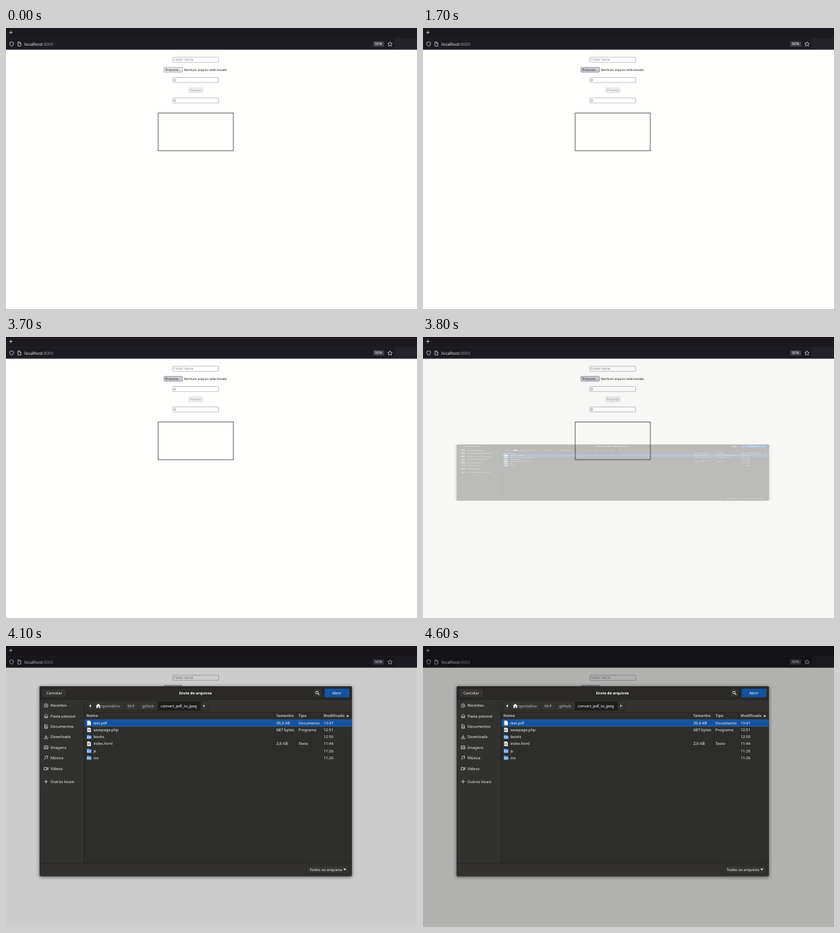
An HTML page for the animation above (5100 ms loop, 600x412 px).

```html
<!DOCTYPE html>
<html lang="pt-BR">
<head>
<meta charset="utf-8">
<title>Envio de arquivos</title>
<style>
  html, body { margin: 0; width: 100%; height: 100%; overflow: hidden; background: #fefefd; }
  svg { display: block; width: 100vw; height: 100vh; }
  text { font-family: "Noto Sans", "Open Sans", sans-serif; text-rendering: geometricPrecision; white-space: pre; }
  #dialog { filter: drop-shadow(0 1px 2.5px rgba(0, 0, 0, .6)); }
</style>
</head>
<body>
<svg id="stage" viewBox="0 0 600 412" preserveAspectRatio="none">
  <g id="page"></g>
  <rect id="dim" width="600" height="412" opacity="0"/>
  <g id="dialog"></g>
</svg>
<script>
const LOOP = 5100, STEP = 100;
const $ = id => document.getElementById(id);
let layer;

function add(tag, attrs, content) {
  const el = document.createElementNS('http://www.w3.org/2000/svg', tag);
  for (const k in attrs) el.setAttribute(k, attrs[k]);
  if (content) el.textContent = content;
  return layer.appendChild(el);
}
const box = (x, y, width, height, fill, more) => add('rect', { x, y, width, height, fill, ...more });
const text = (x, y, str, size, fill, more) => add('text', { x, y, 'font-size': size, fill, ...more }, str);
const line = (d, stroke, width = .8, more) => add('path', { d, stroke, 'stroke-width': width, fill: 'none', ...more });
const shape = (d, fill) => add('path', { d, fill });
const frame = (x, y, w, h, fill, stroke, width = .6, rx = .8) =>
  box(x, y, w, h, fill, { stroke, 'stroke-width': width, rx });

// Browser window
layer = $('page');
box(0, 0, 600, 412, '#fefefd');
box(0, 0, 600, 15, '#1c1a1f');
box(0, 14.5, 600, 17, '#24222a');
box(0, 15.5, 567.5, 15, '#1c1b21', { rx: 1 });
box(0, 30.6, 600, 1, '#2c2030');
line('M4.6 6.5h5M7.1 4v5', '#dddde2', .8);
line('M8.2 20.2l2.7 1v2.2q0 2.2-2.7 3.4q-2.7-1.2-2.7-3.4v-2.2z', '#d5d5da', .8);
line('M17.4 20.4h2.5l1.8 1.8v4.3h-4.3zM19.7 20.5v1.9h2', '#d5d5da', .8);
text(27, 25.6, 'localhost', 6.25, '#f3f3f5');
text(53.5, 25.6, ':8000', 6.1, '#96959d');
box(536, 19.4, 16, 7.9, '#42414c', { rx: 1 });
text(538.4, 25.4, '90%', 5.5, '#f0f0f3');
line('M560.6 20.1l1 2.2 2.4.3-1.8 1.6.5 2.4-2.1-1.2-2.1 1.2.5-2.4-1.8-1.6 2.4-.3z', '#e0e0e5', .7);

// Form
const field = (y, str, color) => {
  const el = frame(243.5, y, 67, 7.4, '#fff', '#9a9aa2');
  text(245.1, y + 5.4, str, 4.7, color);
  return el;
};
const folder = field(42.9, 'Folder Name', '#85858a');
const browse = frame(230.7, 57.8, 26.8, 7, '#e9e9ed', '#85858e');
text(232.4, 63, 'Procurar…', 4.75, '#111');
text(259.6, 63, 'Nenhum arquivo selecionado.', 4.55, '#151515');
const count = field(72.5, '0', '#222');
frame(266.9, 87.9, 20.3, 6.9, '#f4f4f5', '#c3c3c7');
text(268.6, 93, 'Process', 4.7, '#8d8d92');
field(102.5, '0', '#222');
box(222.1, 124.7, 109.8, 55.2, 'none', { stroke: '#4c4c4c', 'stroke-width': .9 });

// File chooser
layer = $('dialog');
const INK = '#eeeeec', SOFT = '#b9b9b6', EDGE = '#1b1b1a', SIZE = 5.65;
const label = (x, y, str, size = SIZE, fill = INK, more) => text(x, y + 2, str, size, fill, more);
const bold = { 'font-weight': 700 };

box(49.2, 59, 455.8, 278.5, '#2d2d2c', { rx: 1.5 });
box(49.2, 59, 455.8, 19.6, '#2a2928', { rx: 1.5 });
box(49.2, 78.2, 455.8, .6, EDGE);
box(49.2, 78.8, 64.6, 239.4, '#31312f');
box(113.8, 78.8, .6, 239.4, EDGE);
box(114.4, 78.8, 390.6, 18.2, '#333230');
box(114.4, 96.8, 390.6, .5, EDGE);
box(49.2, 318, 455.8, 19.2, '#32312f', { rx: 1.5 });
box(49.2, 317.8, 455.8, .6, EDGE);

frame(52.3, 62.4, 36.2, 12.9, '#343331', EDGE, .6, 1.8);
label(59, 68.8, 'Cancelar');
label(252.8, 68.8, 'Envio de arquivos', 5.45, '#fff', bold);
frame(447.9, 62.4, 13.6, 12.9, '#323130', EDGE, .6, 1.8);
add('circle', { cx: 454, cy: 68.1, r: 1.9, fill: 'none', stroke: INK, 'stroke-width': .9 });
line('M455.4 69.6l2 2', INK, 1.1);
frame(465, 62.4, 36.6, 12.9, '#15539e', '#0f3b71', .6, 1.8);
label(476.3, 68.8, 'Abrir', SIZE, '#fff');

// Path bar
frame(118, 81.2, 177.2, 13.4, '#353432', EDGE, .6, 1.8);
box(221.7, 81.4, 62.4, 13, '#1e1e1d');
for (const x of [127.5, 171.9, 193.6, 221.5, 284.1]) box(x, 81.4, .5, 13, '#242423');
shape('M124 85.6v4.4l-2.6-2.2z', INK);
shape('M288 85.6v4.4l2.6-2.2z', SOFT);
shape('M134.7 84.5l3.7 3.4h-1v3.1h-1.9v-2.2h-1.6v2.2h-1.9v-3.1h-1z', INK);
[[139.4, 'quintalino', SOFT], [177.2, 'MrP', SOFT], [198.7, 'github', SOFT], [225.8, 'convert_pdf_to_jpeg', '#fff']]
  .forEach(([x, str, fill]) => label(x, 87.7, str, 5.6, fill));

// Places, each with an outline icon around (0, 0)
const ring = 'M-2.6 0a2.6 2.6 0 1 0 5.2 0a2.6 2.6 0 1 0 -5.2 0';
const places = [
  ['Recentes', 87.3, ring + 'M0-1.5V.2H1.5'],
  ['Pasta pessoal', 102.7, 'M-3 .1L0-2.6 3 .1M-2.1-.3v2.9h1.4v-1.8h1.4v1.8h1.4v-2.9'],
  ['Documentos', 118, 'M-2-2.7h2.7l1.4 1.4v4h-4.1zM-1-.2h2M-1 1.2h2'],
  ['Downloads', 133.3, 'M0-2.8v3.6M-1.7-.7L0 1l1.7-1.7M-2.6 1v1.6h5.2v-1.6'],
  ['Imagens', 148.7, 'M-2.7-2.1h5.4v4.2h-5.4zM-2.4 1.6l1.8-2 1.2 1.1 1-.8 1 1.5'],
  ['Música', 164, 'M-1.3 1.6v-3.8l3.4-.6v3.7M-2.7 1.8h1.2M.7 1.1h1.2'],
  ['Vídeos', 179.8, 'M-2.8-1.8h3.7v3.6h-3.7zM1-.4l1.9-1.2v3.2l-1.9-1.2'],
  ['Outros locais', 198.9, 'M-2.8 0h5.6M0-2.8v5.6'],
];
for (const [name, y, icon] of places) {
  line(icon, '#dededb', .75, { transform: `translate(58.5 ${y})` });
  label(65, y, name);
}

// File list
const columns = [394.4, 427, 463.6];
label(117.3, 102.2, 'Nome', SIZE, SOFT, bold);
['Tamanho', 'Tipo', 'Modificado'].forEach((s, i) => label(columns[i], 102.2, s, 5.5, SOFT, bold));
for (const x of [391, 424.2, 460.3]) box(x, 97.2, .5, 10, '#20201f');
shape('M496.7 103.4h4.2l-2.1-2.4z', INK);
box(114.4, 107.2, 390.6, .4, EDGE);
box(114.6, 107.9, 390.2, 10, '#15539e');
line('M114.6 108.1h390.2M114.6 117.7h390.2', '#3c76b9', .5);

const files = [
  ['test.pdf', '36,6 kB', 'Documento', '13:47'],
  ['savepage.php', '687 bytes', 'Programa', '12:51'],
  ['books', '', '', '12:50'],
  ['index.html', '2,6 kB', 'Texto', '11:44'],
  ['js', '', '', '11:26'],
  ['css', '', '', '11:26'],
];
files.forEach(([name, ...info], i) => {
  const y = 112.9 + i * 10.15;
  if (info[0]) {
    shape(`M118.5 ${y - 3.3}h3.9l1.6 1.6v5h-5.5z`, '#f0f0ee');
    if (i) {
      box(119.7, y - 1, 3, 2.4, '#5b7fa8');
      box(120.6, y - .3, 1.2, 1, '#e8eef5');
    }
  } else {
    box(118, y - 2.9, 3.2, 2, '#438de6', { rx: .5 });
    box(118, y - 2.2, 6.4, 5.1, '#438de6', { rx: .5 });
    box(118, y - 1.2, 6.4, 4.1, '#8db9ee', { rx: .5 });
  }
  label(127.4, y, name);
  info.forEach((s, k) => s && label(columns[k], y, s, k ? 5.6 : 5.9));
});

frame(438.7, 321.2, 62.6, 13.2, '#353432', EDGE, .6, 1.8);
label(443.3, 327.8, 'Todos os arquivos');
shape('M492.4 326.4h4.4l-2.2 2.6z', INK);

// Motion: pointer hovers, then the dialog unfolds and the page dims
const clamp = v => Math.max(0, Math.min(1, v));
const during = (t, ...spans) => spans.some(([a, b]) => t >= a && t < b);
const edge = (el, on) => el.setAttribute('stroke', on ? '#5d5d66' : '#9a9aa2');

function draw(t) {
  edge(folder, during(t, [500, 800]));
  edge(count, during(t, [1300, 1500], [2600, 3100]));
  const hover = during(t, [900, 1200], [1700, 2500], [3300, LOOP]);
  const press = during(t, [3500, 3700]);
  browse.setAttribute('fill', press ? '#b1b1b9' : hover ? '#d0d0d7' : '#e9e9ed');
  browse.setAttribute('stroke', hover ? '#63636c' : '#85858e');

  $('dim').setAttribute('opacity', .306 * clamp((t - 3750) / 550));
  const open = t < 3800 ? 0 : t < 3900 ? .294 : 1;
  $('dialog').setAttribute('visibility', open ? 'visible' : 'hidden');
  $('dialog').setAttribute('opacity', open);
  $('dialog').setAttribute('transform', `translate(0 ${198.8 * (1 - open)}) scale(1 ${open || 1})`);
}

const start = performance.now();
function tick() {
  const t = (performance.now() - start) % LOOP;
  draw(Math.floor(t / STEP) * STEP);
  requestAnimationFrame(tick);
}
tick();
</script>
</body>
</html>
```
